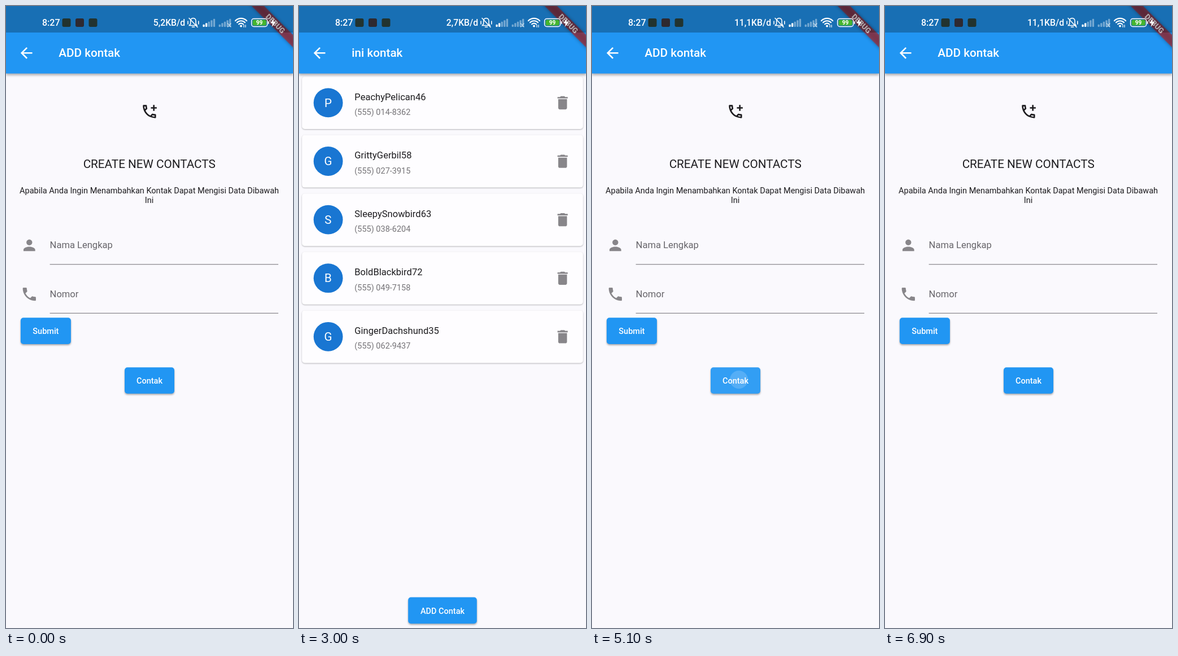
Animation of 508x1102 px, one loop 7400 ms. Source, as an HTML page:

```html
<!DOCTYPE html>
<html lang="id">
<head>
<meta charset="utf-8">
<title>Kontak</title>
<style>
  html, body { margin: 0; width: 100%; height: 100%; overflow: hidden; background: #faf9fd; }
  svg { font-family: Roboto, sans-serif; }
  #stage { display: block; width: 100vw; height: 100vh; }
  .bar { fill: #2196f3; filter: drop-shadow(0 3px 2.2px rgba(0, 0, 0, .3)); }
  .card { fill: #fefdff; filter: drop-shadow(0 1.3px 1px rgba(0, 0, 0, .28)); }
  .button { fill: #2196f3; filter: drop-shadow(0 2px 1.8px rgba(0, 0, 0, .32)); }
  .banner { fill: #b71c1c; fill-opacity: .63; filter: drop-shadow(0 0 3px rgba(0, 0, 0, .55)); }
</style>
</head>
<body>
<svg id="stage" viewBox="0 0 508 1102" preserveAspectRatio="none"></svg>
<script>
const LOOP = 7400, STEP = 100, W = 508, H = 1102, DP = 1.2936;
const BLACK = '#1d1c1f', GREY = '#88868a';

const ICONS = {
  back: 'M20 11H7.83l5.59-5.59L12 4l-8 8 8 8 1.41-1.41L7.83 13H20v-2z',
  trash: 'M6 19c0 1.1.9 2 2 2h8c1.1 0 2-.9 2-2V7H6v12zM19 4h-3.5l-1-1h-5l-1 1H5v2h14V4z',
  person: 'M12 12c2.21 0 4-1.79 4-4s-1.79-4-4-4-4 1.79-4 4 1.79 4 4 4zm0 2c-2.67 0-8 1.34-8 4v2h16v-2c0-2.66-5.33-4-8-4z',
  phone: 'M6.62 10.79c1.44 2.83 3.76 5.14 6.59 6.59l2.2-2.2c.27-.27.67-.36 1.02-.24 1.12.37 2.33.57 3.57.57.55 0 1 .45 1 1V20c0 .55-.45 1-1 1-9.39 0-17-7.61-17-17 0-.55.45-1 1-1h3.5c.55 0 1 .45 1 1 0 1.25.2 2.45.57 3.57.11.35.03.74-.25 1.02l-2.2 2.2z',
  addCall: 'M6.54 5c.06.89.21 1.76.45 2.59l-1.2 1.2c-.41-1.2-.67-2.47-.76-3.79h1.51m9.86 12.02c.85.24 1.72.39 2.6.45v1.49c-1.32-.09-2.59-.35-3.8-.75l1.2-1.19M7.5 3H4c-.55 0-1 .45-1 1 0 9.39 7.61 17 17 17 .55 0 1-.45 1-1v-3.49c0-.55-.45-1-1-1-1.24 0-2.45-.2-3.57-.57-.1-.04-.21-.05-.31-.05-.26 0-.51.1-.71.29l-2.2 2.2c-2.83-1.45-5.15-3.76-6.59-6.59l2.2-2.2c.28-.28.36-.67.25-1.02C8.7 6.45 8.5 5.25 8.5 4c0-.55-.45-1-1-1zM22 8h-3v3h-2V8h-3V6h3V3h2v3h3z'
};

const rect = (x, y, w, h, attrs = '') =>
  `<rect x="${x}" y="${y}" width="${w}" height="${h}" ${attrs}/>`;
const text = (str, x, y, size, fill, attrs = '') =>
  `<text x="${x}" y="${y}" font-size="${size}" fill="${fill}" ${attrs}>${str}</text>`;
const icon = (name, cx, cy, fill) =>
  `<path d="${ICONS[name]}" fill="${fill}" transform="translate(${cx} ${cy}) scale(${DP}) translate(-12 -12)"/>`;
const MIDDLE = 'text-anchor="middle"', MEDIUM = 'font-weight="500"';

const button = (id, label, x, y, w, tapX, tapY) =>
  rect(x, y, w, 46.6, 'rx="5" class="button"') +
  `<svg id="${id}" x="${x}" y="${y}" width="${w}" height="46.6" style="display:none" fill="#fff">` +
  rect(0, 0, w, 46.6, 'rx="5" opacity=".08"') +
  `<circle cx="${tapX - x}" cy="${tapY - y}" opacity=".17"/></svg>` +
  text(label, x + w / 2, y + 29, 14.5, '#fff', `${MIDDLE} ${MEDIUM}`);

const page = (id, title, body) =>
  `<g id="${id}">${rect(0, 0, W, H, 'fill="#faf9fd"')}${body}` +
  rect(0, 0, W, 119.6, 'class="bar"') + icon('back', 36.2, 83.3, '#fff') +
  text(title, 93.2, 90.4, 20.7, '#fff', MEDIUM) + '</g>';

const field = (name, label, y) =>
  icon(name, 41.3, y, GREY) + text(label, 77.6, y + 4.9, 16.56, '#67656a') +
  rect(77.6, y + 33.1, 404.4, 1.3, 'fill="#8f8d92"');

const form = page('form', 'ADD kontak',
  icon('addCall', 253.9, 187, BLACK) +
  text('CREATE NEW CONTACTS', 253.7, 287, 20.7, BLACK, MIDDLE) +
  text('Apabila Anda Ingin Menambahkan Kontak Dapat Mengisi Data Dibawah', 253.6, 332.2, 14.5, BLACK, MIDDLE) +
  text('Ini', 253.6, 349.2, 14.5, BLACK, MIDDLE) +
  field('person', 'Nama Lengkap', 424) + field('phone', 'Nomor', 510.6) +
  button('submit', 'Submit', 25.9, 552.3, 89, 70, 576) +
  button('contacts', 'Contak', 210, 640.2, 88, 260, 662));

const people = [
  ['PeachyPelican46', '(555) 014-8362'],
  ['GrittyGerbil58', '(555) 027-3915'],
  ['SleepySnowbird63', '(555) 038-6204'],
  ['BoldBlackbird72', '(555) 049-7158'],
  ['GingerDachshund35', '(555) 062-9437']
];
const card = ([name, number], i) => `<g transform="translate(0 ${i * 103.6})">` +
  rect(5.2, 125, 497.6, 93, 'rx="5" class="card"') +
  '<circle cx="51.7" cy="171.4" r="25.9" fill="#1976d2"/>' +
  text(name[0], 51.5, 178.7, 20.7, '#fff', MIDDLE) +
  text(name, 98.3, 166.5, 16.56, BLACK) +
  text(number, 98.3, 193, 14.5, '#757377') +
  icon('trash', 466.6, 171.5, GREY) + '</g>';
const list = page('list', 'ini kontak',
  people.map(card).join('') + button('add', 'ADD Contak', 193.2, 1047.6, 121.6, 253, 1071));

const signal = (x, lit) => [0, 1, 2, 3, 4].map(i =>
  rect(x + i * 4.6, 32.8 - i * 2.5, 3.3, 4.2 + i * 2.5, `rx="1" fill="#fff" opacity="${i < lit ? 1 : .4}"`)).join('');
const wifiArc = r => `<path d="M${416 - r * .72} ${36 - r * .7}A${r} ${r} 0 0 1 ${416 + r * .72} ${36 - r * .7}"/>`;

const statusBar = rect(0, 0, W, 47, 'fill="#000" opacity=".26"') +
  text('8:27', 64, 35.2, 16, '#fff', MEDIUM) +
  rect(99.5, 22, 15, 15, 'rx="3" fill="#22332f"') +
  rect(123, 22, 15, 15, 'rx="3" fill="#2e2930"') +
  rect(146.5, 22, 15, 15, 'rx="3" fill="#22332f"') +
  text('', 317, 35.2, 15.7, '#fff', `id="speed" text-anchor="end" ${MEDIUM}`) +
  `<g fill="none" stroke="#fff" stroke-width="1.6" stroke-linecap="round">
    <path d="M324.5 34.5h13.5l-2-3v-5q0-4.5-4.7-5q-4.7.5-4.7 5v5zM329.5 37.3h4M324 21.5l15 16M322 27v5M340.8 27v5"/>
    <path d="M392.5 31l5.5 6m0-6l-5.5 6" stroke-width="1.3" opacity=".65"/>
    <g stroke-width="2.2">${[14, 9.7, 5.4].map(wifiArc).join('')}</g>
    <path d="M421 33.5v4m3-4v4" stroke-width="1.2"/>
  </g><circle cx="416" cy="35.5" r="2" fill="#fff"/>` +
  signal(348.4, 2) + signal(376.6, 0) +
  rect(434.6, 22.5, 28, 14, 'rx="4" fill="none" stroke="#fff" stroke-width="1.5"') +
  rect(436.5, 24.4, 24.2, 10.2, 'rx="2.5" fill="#45b52f"') +
  rect(463.8, 27, 1.8, 5, 'rx=".9" fill="#fff"') +
  text('99', 448.5, 33.3, 10, '#fff', `${MIDDLE} font-weight="700"`) +
  '<path d="M474 22.5l-6 8h4l-1.5 6.5 7-8.5h-4z" fill="#fff"/>';

const banner = `<g transform="translate(${W} 0) rotate(45)">` +
  rect(-80, 36.2, 160, 15.5, 'class="banner"') +
  text('DEBUG', 0, 48.7, 13.2, '#fff', `${MIDDLE} font-weight="900" opacity=".85"`) + '</g>';

const byId = id => document.getElementById(id);
byId('stage').innerHTML = `<g id="pages">${list}${form}</g>${banner}${statusBar}`;
const pages = byId('pages'), speed = byId('speed');

// The list rises from below, the form enters from the right.
const slides = [
  { id: 'form', start: -1000, shown: -1000 },
  { id: 'list', start: 1871.8, shown: 1872 },
  { id: 'form', start: 3558.5, shown: 3559 },
  { id: 'list', start: 5014.5, shown: 5150 },
  { id: 'form', start: 6400.5, shown: 6401 }
];
const taps = [
  { id: 'contacts', down: 1740, up: 1872 },
  { id: 'add', down: 3350, up: 3559 },
  { id: 'contacts', down: 4940, up: 5110 },
  { id: 'add', down: 6380, up: 6401 }
];

function render(t) {
  const slide = slides.filter(s => t >= s.shown).pop();
  const rest = Math.max(0, 1 - (t - slide.start) / 300) ** 2;
  const top = byId(slide.id);
  const under = byId(slide.id === 'form' ? 'list' : 'form');
  if (pages.lastChild !== top) pages.append(top);
  under.setAttribute('transform', 'translate(0 0)');
  under.setAttribute('visibility', rest ? 'visible' : 'hidden');
  top.setAttribute('visibility', 'visible');
  top.setAttribute('transform', slide.id === 'form' ? `translate(${W * rest} 0)` : `translate(0 ${H * rest})`);

  for (const id of ['contacts', 'add']) {
    const tap = taps.find(p => p.id === id && t >= p.down && t < p.up + 300);
    const ink = byId(id);
    ink.style.display = tap ? '' : 'none';
    if (tap) ink.querySelector('circle').setAttribute('r', (t - tap.down) * .1 + Math.max(0, t - tap.up));
  }
  speed.textContent = (t < 600 ? '5,2' : t < 4600 ? '2,7' : '11,1') + 'KB/d';
}

const begin = performance.now();
(function tick() {
  const t = (performance.now() - begin) % LOOP;
  render(Math.floor(t / STEP) * STEP);
  requestAnimationFrame(tick);
})();
</script>
</body>
</html>
```
